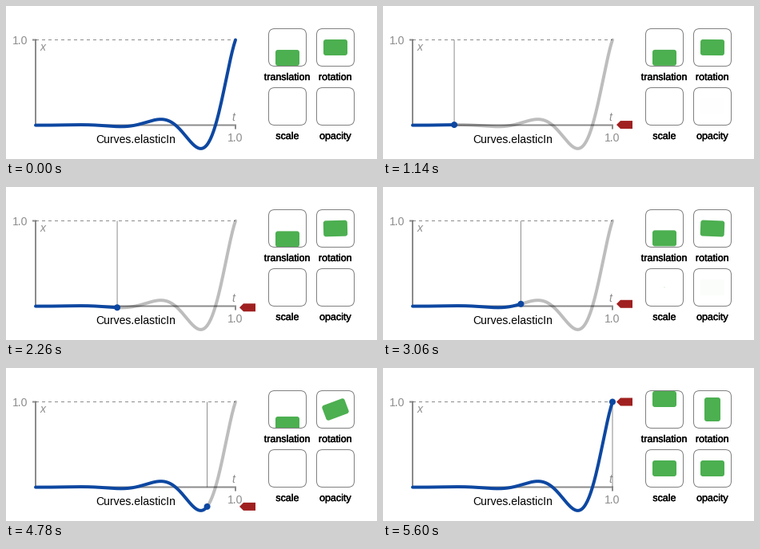
Recreate the animation shown at these times as a matplotlib script. Size 464 by 192 pixels, loop 5620 ms.

```python
import numpy as np
import matplotlib.pyplot as plt
from matplotlib.animation import FuncAnimation
from matplotlib.patches import Circle, FancyBboxPatch, Polygon
from matplotlib.patheffects import withStroke
from matplotlib.transforms import Affine2D

W, H, DPI = 464, 192, 64
PX = 72 / DPI  # points per pixel
STEPS = 120
TICKS, TICK_MS = 281, 20

LEFT, RIGHT, TOP, BOTTOM = 37, 287, 42.5, 149.5
BLUE, GREEN, RED = "#0d47a1", "#4caf50", "#a02020"
GREY = (0, 0, 0, 0.45)
FAINT = (0, 0, 0, 0.26)

plt.rcParams["font.family"] = "Liberation Sans"
fig = plt.figure(figsize=(W / DPI, H / DPI), dpi=DPI, facecolor="white")
ax = fig.add_axes([0, 0, 1, 1])
ax.set(xlim=(0, W), ylim=(H, 0))
ax.axis("off")


def elastic_in(t, period=0.4):
    u = np.asarray(t, dtype=float) - 1
    return -(2 ** (10 * u)) * np.sin((u - period / 4) * 2 * np.pi / period)


def to_x(t):
    return LEFT + t * (RIGHT - LEFT)


def to_y(v):
    return BOTTOM - v * (BOTTOM - TOP)


def line(xs, ys, color, width, **kw):
    return ax.plot(xs, ys, color=color, lw=width * PX, snap=False, **kw)[0]


def label(x, y, s, size, color, ha="center", **kw):
    return ax.text(x, y, s, fontsize=size * PX, color=color, ha=ha,
                   va="baseline", **kw)


def rounded(x, y, w, h, r, **kw):
    style = f"round,pad=0,rounding_size={r}"
    return ax.add_patch(FancyBboxPatch((x, y), w, h, boxstyle=style, **kw))


def tile(cx, cy, name):
    """Framed cell with its caption and a green block centred on (0, 0)."""
    frame = rounded(cx - 23.5, cy - 23.5, 47, 47, 7.5, fc="none",
                    ec="#808080", lw=PX, zorder=6)
    label(cx, cy + 41, name, 12.5, "black",
          path_effects=[withStroke(linewidth=0.4 * PX, foreground="black")])
    block = rounded(-15, -10, 30, 20, 3, fc=GREEN, ec="none", zorder=5)
    block.set_clip_path(frame)
    return block, cx, cy


def place(item, dx=0, dy=0, turn=0, scale=1):
    block, cx, cy = item
    move = Affine2D().scale(scale).rotate(turn).translate(cx + dx, cy + dy)
    block.set_transform(move + ax.transData)


# Axes and labels
line([LEFT - 4, LEFT, LEFT, RIGHT, RIGHT],
     [TOP, TOP, BOTTOM, BOTTOM, BOTTOM + 5], GREY, 2,
     solid_joinstyle="miter", solid_capstyle="butt")
line([LEFT, RIGHT], [TOP, TOP], GREY, 1, dashes=(4, 4), dash_capstyle="butt")
label(27.3, 48, "1.0", 14, GREY, ha="right")
label(RIGHT, 170, "1.0", 14, GREY)
label(43, 56, "x", 14, GREY, ha="left", style="italic")
label(284.3, 144, "t", 14, GREY, style="italic")
label(162, 172, "Curves.elasticIn", 14, "black")

# Moving parts
guide = line([], [], GREY, 1, solid_capstyle="butt", zorder=2.5)
ahead = line([], [], FAINT, 4, solid_capstyle="round",
             solid_joinstyle="round", zorder=3)
done = line([], [], BLUE, 4, solid_capstyle="round",
            solid_joinstyle="round", zorder=3.5)
dot = ax.add_patch(Circle((0, 0), 4, fc=BLUE, ec="none", zorder=4))
arrow = ax.add_patch(Polygon([(0, 0), (1, 1), (1, 0)], fc=RED, ec="none",
                             zorder=4))
ARROW = np.array([(292, 0), (297, -5), (312, -5), (312, 5), (297, 5)])

slide = tile(352, 52, "translation")
spin = tile(412, 52, "rotation")
grow = tile(352, 126, "scale")
fade = tile(412, 126, "opacity")
place(fade)


def step_at(tick):
    """Steps last 100, 20 and 20 ms in turn after a first one of 20 ms."""
    if tick == 0:
        return 0
    group, rest = divmod(tick - 1, 7)
    return 1 + 3 * group + max(0, rest - 4)


def trace(artist, a, b):
    t = np.linspace(a, b, 240)
    artist.set_data(to_x(t), to_y(elastic_in(t)))


def update(tick):
    step = step_at(tick)
    t = step / STEPS
    v = float(elastic_in(t))
    x, y = to_x(t), to_y(v)
    running = step > 0

    trace(done, 0, t if running else 1)
    trace(ahead, t, 1)
    guide.set_data([x, x], [TOP, BOTTOM])
    dot.center = x, y
    arrow.set_xy(ARROW + [0, y])
    for part in (guide, dot, arrow):
        part.set_visible(running)
    ahead.set_visible(running and step < STEPS)

    place(slide, dy=13 - 26 * v)
    place(spin, turn=v * np.pi / 2)
    place(grow, scale=max(v, 1e-6))
    grow[0].set_visible(v > 0)
    fade[0].set_alpha(min(max(v, 0), 1))
    return ()


anim = FuncAnimation(fig, update, frames=TICKS, interval=TICK_MS,
                     repeat=True, repeat_delay=0, blit=False)
plt.show()
```
